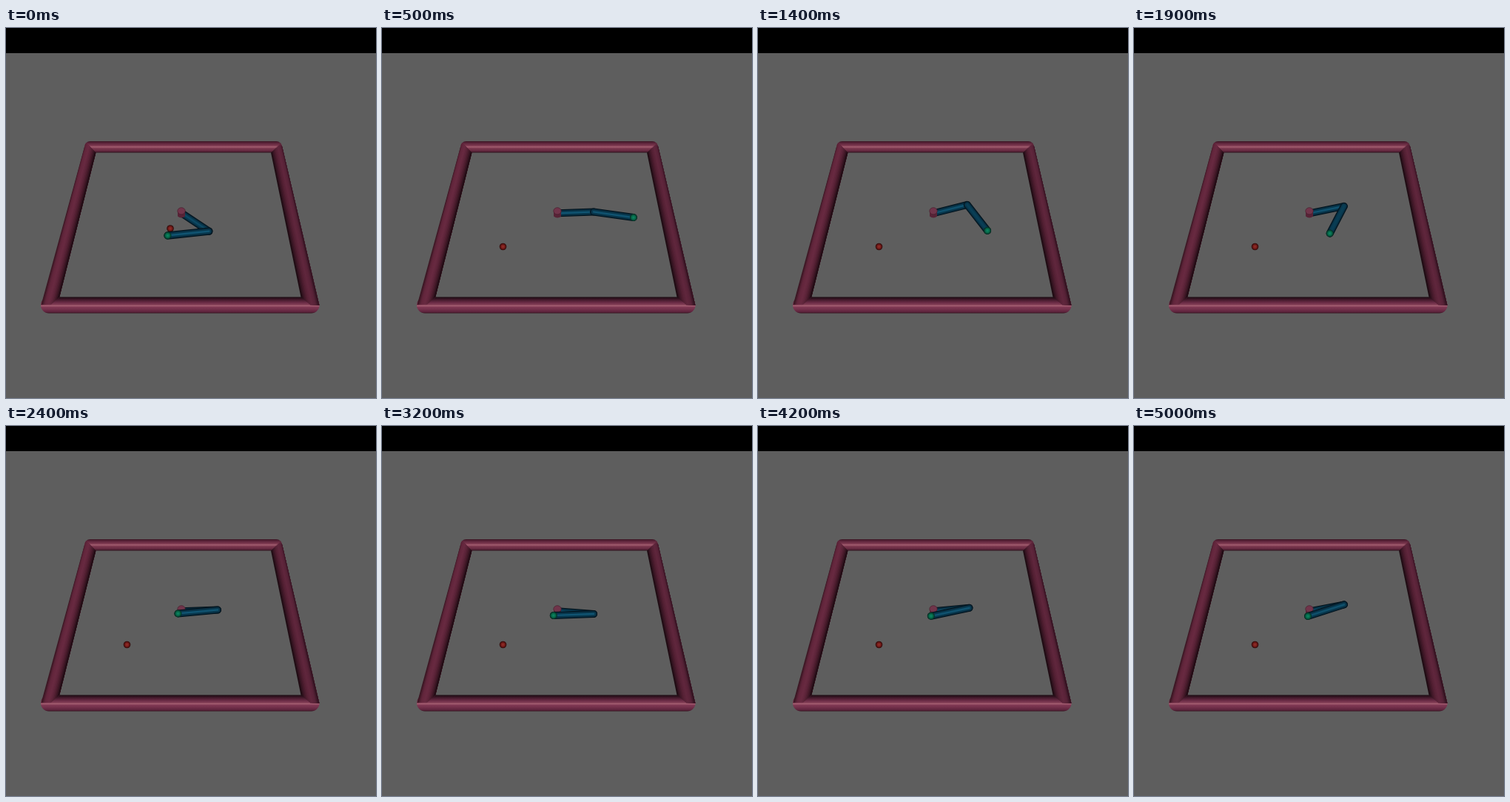
Write an HTML page that moves like this. It is 500 px wide and 500 px high and loops after 5.1 s.

```html
<!DOCTYPE html>
<html>
<head>
<meta charset="utf-8">
<style>
html, body { margin: 0; width: 100%; height: 100%; overflow: hidden; background: #5e5e5e; }
svg { display: block; width: 100vw; height: 100vh; }
</style>
</head>
<body>
<svg id="stage" viewBox="0 0 500 500">
  <defs>
    <linearGradient id="near" x1="0" y1="0" x2="0" y2="1">
      <stop offset="0" stop-color="#1a0a11"/>
      <stop offset=".14" stop-color="#3c1727"/>
      <stop offset=".34" stop-color="#6a2b45"/>
      <stop offset=".47" stop-color="#823d55"/>
      <stop offset=".54" stop-color="#a66073"/>
      <stop offset=".61" stop-color="#823a55"/>
      <stop offset=".75" stop-color="#74304b"/>
      <stop offset=".92" stop-color="#5c233c"/>
      <stop offset="1" stop-color="#35131f"/>
    </linearGradient>
    <linearGradient id="far" x1="0" y1="0" x2="0" y2="1">
      <stop offset="0" stop-color="#3a1523"/>
      <stop offset=".15" stop-color="#5a2339"/>
      <stop offset=".38" stop-color="#7c384f"/>
      <stop offset=".5" stop-color="#a25e70"/>
      <stop offset=".62" stop-color="#7c384f"/>
      <stop offset=".85" stop-color="#63283f"/>
      <stop offset="1" stop-color="#2d111c"/>
    </linearGradient>
    <radialGradient id="red">
      <stop offset="0" stop-color="#94302a"/>
      <stop offset=".55" stop-color="#741a18"/>
      <stop offset="1" stop-color="#280808"/>
    </radialGradient>
    <radialGradient id="green">
      <stop offset="0" stop-color="#0d8a66"/>
      <stop offset=".55" stop-color="#066748"/>
      <stop offset="1" stop-color="#03291e"/>
    </radialGradient>
  </defs>
  <rect width="500" height="500" fill="#5e5e5e"/>
  <rect width="500" height="34" fill="#000"/>
  <g id="walls"></g>
  <circle id="goal" r="4.8" fill="url(#red)"/>
  <g id="upper"></g>
  <g>
    <path d="M232 247V254.5Q237 258.5 242 254.5V247Z" fill="#572336"/>
    <ellipse cx="237" cy="247.3" rx="5.2" ry="4.6" fill="#70344a" stroke="#47202e" stroke-width=".7"/>
  </g>
  <g id="fore"></g>
  <circle id="tip" r="5" fill="url(#green)"/>
</svg>
<script>
const NS = "http://www.w3.org/2000/svg";
const $ = id => document.getElementById(id);
const LOOP = 5100, STEP = 100;

function add(parent, tag, attrs) {
  const el = document.createElementNS(NS, tag);
  set(el, attrs);
  parent.appendChild(el);
  return el;
}
function set(el, attrs) {
  for (const k in attrs) el.setAttribute(k, attrs[k]);
}

// Ground plane to screen, with the perspective of the tilted camera.
function project(x, y) {
  const w = 1 + 0.544 * y;
  return { x: 237.5 + (486.6 * x + 6.5 * y) / w, y: 250.3 - 347 * y / w, s: 1 / w };
}

function mix(stops, u) {
  const n = stops.length - 1, i = Math.min(n - 1, Math.floor(u * n)), f = u * n - i;
  return "rgb(" + stops[i].map((c, k) => Math.round(c + (stops[i + 1][k] - c) * f)) + ")";
}

// A tapering tube of overlapping lengthwise strips, mitred into the far and
// near walls; inward is the side (1 right, -1 left) that faces the middle.
function sideWall(top, bottom, inward, stops) {
  const [x1, y1, r1] = top, [x2, y2, r2] = bottom, n = 14;
  const yTop = s => y1 + 8 * Math.max(s, -Math.sqrt(1 - s * s));
  const yLow = s => y2 - 11 * Math.max(s, 0);
  for (let i = 0; i < n; i++) {
    const t = -1 + 2 * i / n, s = t * inward;
    add($("walls"), "path", {
      d: `M${x1 + t * r1} ${yTop(s)}L${x1 + r1} ${yTop(inward)}` +
         `L${x2 + r2} ${yLow(inward)}L${x2 + t * r2} ${yLow(s)}Z`,
      fill: mix(stops, (i + 0.5) / n)
    });
  }
}

function buildWalls() {
  const g = $("walls");
  add(g, "rect", { x: 106, y: 153, width: 267, height: 15.5, rx: 7.7, fill: "url(#far)" });
  add(g, "rect", { x: 47, y: 363.5, width: 376.5, height: 22, rx: 11, fill: "url(#near)" });
  const left = [[50, 18, 30], [98, 38, 60], [104, 42, 65], [90, 35, 56], [64, 24, 39], [24, 9, 15]];
  const right = [[22, 8, 14], [60, 22, 37], [84, 32, 52], [96, 39, 61], [88, 35, 56], [42, 16, 27]];
  sideWall([113.7, 160.5, 7.6], [59.8, 374.5, 12.4], 1, left);
  sideWall([365.6, 160.5, 7.6], [410.9, 374.5, 12.4], -1, right);
}

// Joint angles in degrees: time, shoulder, then elbow bend.
const SHOULDER = [[100, 0], [500, 3], [900, 10.3], [1200, 16.3], [1400, 19.5], [1600, 19.9],
  [1900, 16], [2400, 3], [2800, -6.5], [3200, -6], [3600, -0.3], [4200, 7.5], [5000, 15.2]];
const ELBOW = [[100, -2], [500, -14.3], [1400, -82.5], [1900, -128], [2400, -175.6],
  [2600, -172], [3200, -171], [5000, -171]];

// Cubic curve through the keys.
function curve(keys, t) {
  let i = 0;
  while (i < keys.length - 2 && t > keys[i + 1][0]) i++;
  const slope = j => {
    const a = keys[Math.max(0, j - 1)], b = keys[Math.min(keys.length - 1, j + 1)];
    return (b[1] - a[1]) / (b[0] - a[0]);
  };
  const [t0, v0] = keys[i], [t1, v1] = keys[i + 1], h = t1 - t0, u = (t - t0) / h;
  const m0 = slope(i) * h, m1 = slope(i + 1) * h, u2 = u * u, u3 = u2 * u;
  return (2 * u3 - 3 * u2 + 1) * v0 + (u3 - 2 * u2 + u) * m0 + (3 * u2 - 2 * u3) * v1 + (u3 - u2) * m1;
}

const LAYERS = [[10, "#03131c"], [8, "#06293c"], [5.6, "#08394f"], [2.2, "#125674"]];
function makeLink(g) {
  return LAYERS.map(([, stroke]) => add(g, "line", { stroke, "stroke-linecap": "round" }));
}
function drawLink(lines, a, b, angle) {
  const size = (a.s + b.s) / 2;
  lines.forEach((el, i) => set(el, {
    x1: a.x, y1: a.y, x2: b.x, y2: b.y,
    "stroke-width": LAYERS[i][0] * size,
    opacity: i === 3 ? Math.cos(angle) ** 2 : 1
  }));
}

buildWalls();
const upper = makeLink($("upper")), fore = makeLink($("fore"));

function draw(t) {
  const first = t < STEP, rad = Math.PI / 180;
  const q1 = (first ? -42.5 : curve(SHOULDER, t)) * rad;
  const q2 = q1 + (first ? -129.5 : curve(ELBOW, t)) * rad;
  const ex = 0.1 * Math.cos(q1), ey = 0.1 * Math.sin(q1);
  const base = project(0, 0), elbow = project(ex, ey);
  const end = project(ex + 0.111 * Math.cos(q2), ey + 0.111 * Math.sin(q2));
  drawLink(upper, base, elbow, q1);
  drawLink(fore, elbow, end, q2);
  set($("tip"), { cx: end.x, cy: end.y });
  set($("goal"), first ? { cx: 222, cy: 271 } : { cx: 163.5, cy: 295.5 });
}

const start = performance.now();
function tick() {
  const t = (performance.now() - start) % LOOP;
  draw(Math.floor(t / STEP) * STEP);
  requestAnimationFrame(tick);
}
tick();
</script>
</body>
</html>
```
